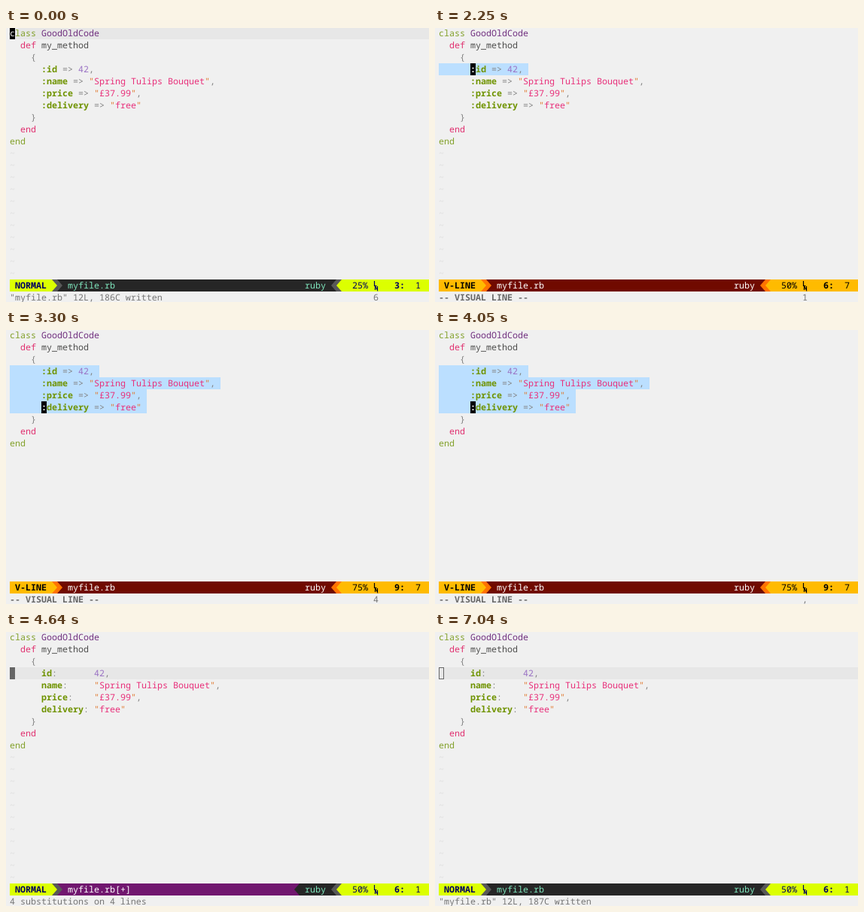
An HTML page that plays this animation: 562x365 px, repeating every 7160 ms.

```html
<!DOCTYPE html>
<html lang="en">
<head>
<meta charset="utf-8">
<style>
  html, body { margin: 0; width: 100%; height: 100%; overflow: hidden; background: #f0f0f0; }
  svg { display: block; }
  text {
    font: 300 11.6667px "Noto Sans Mono", "DejaVu Sans Mono", monospace;
    white-space: pre;
    text-rendering: geometricPrecision;
  }
  .b { font-weight: 700; }
</style>
</head>
<body>
<svg id="stage" width="562" height="365" viewBox="0 0 562 365"></svg>
<script>
(() => {
const LOOP = 7160;
const CELL = 7, ROW = 16, LEFT = 5;
const STATUS_ROW = 21, COMMAND_ROW = 22;

const INK = {
  key: '#82a02a', type: '#70307f', pink: '#e0306f', name: '#4d4d4c',
  sym: '#6f9300', op: '#828282', num: '#9a72c4', str: '#e8307a', quote: '#e07a30'
};

const MODES = {
  normal: { label: 'NORMAL', a: '#dcff00', b: '#585858', c: '#262626', x: '#262626',
            ink: '#00005f', file: '#7fe6bd', type: '#7fe6bd' },
  visual: { label: 'V-LINE', a: '#ffbb00', b: '#ff7300', c: '#700a00', x: '#700a00',
            ink: '#000000', file: '#ffffff', type: '#ffffff' }
};
MODES.modified = { ...MODES.normal, c: '#71176f', file: '#ffffff' };

const PAIRS = [['id', '42'], ['name', 'Spring Tulips Bouquet'], ['price', '£37.99'], ['delivery', 'free']];

// Each state inherits whatever it does not change from the one before.
const steps = [
  [0,    { mode: 'normal', row: 0, col: 0, cursor: 'block', pct: 25, line: 3, keys: '6', tildes: true,
           message: '"myfile.rb" 12L, 186C written', aligned: false, file: 'myfile.rb' }],
  [600,  { row: 3, col: 6, pct: 50, line: 6, keys: '' }],
  [2250, { mode: 'visual', message: '-- VISUAL LINE --', keys: '1' }],
  [2700, { keys: '3' }],
  [3300, { row: 6, pct: 75, line: 9, keys: '4', tildes: false }],
  [4050, { keys: ',' }],
  [4350, { keys: '4,o' }],
  [4490, { keys: '4,oc' }],
  [4640, { mode: 'modified', row: 3, col: 0, cursor: 'dim', pct: 50, line: 6, keys: '', tildes: true,
           message: '4 substitutions on 4 lines', aligned: true, file: 'myfile.rb[+]' }],
  [5540, { keys: ';' }],
  [5840, { mode: 'normal', keys: '', message: '"myfile.rb" 12L, 187C written', file: 'myfile.rb' }],
  [7040, { cursor: 'hollow' }]
];
const states = [];
for (const [at, change] of steps) states.push({ ...states.at(-1), ...change, at });

const colX = col => LEFT + col * CELL;
const rowY = row => row * ROW - 1;
const escapeText = s => s.replace(/&/g, '&amp;').replace(/</g, '&lt;').replace(/>/g, '&gt;');

const fill = (row, from, to, color) =>
  `<rect x="${colX(from)}" y="${rowY(row)}" width="${(to - from) * CELL}" height="${ROW}" fill="${color}"/>`;

const write = (row, col, s, color, bold) =>
  `<text x="${colX(col)}" y="${row * ROW + 11}" fill="${color}"${bold ? ' class="b"' : ''}>${escapeText(s)}</text>`;

function arrow(col, color, back, dir) {
  const base = colX(dir > 0 ? col : col + 1);
  return fill(STATUS_ROW, col, col + 1, back) +
    `<path d="M${base} ${rowY(STATUS_ROW)}l${dir * CELL} ${ROW / 2}l${-dir * CELL} ${ROW / 2}z" fill="${color}"/>`;
}

function pairTokens([key, value], index, aligned) {
  const tokens = aligned
    ? [['sym', key], ['op', ':'.padEnd(10 - key.length)]]
    : [['sym', ':' + key], ['op', ' => ']];
  if (index) tokens.push(['quote', '"'], ['str', value], ['quote', '"']);
  else tokens.push(['num', value]);
  if (index < PAIRS.length - 1) tokens.push(['op', ',']);
  return [['op', '      '], ...tokens];
}

const codeLines = aligned => [
  [['key', 'class '], ['type', 'GoodOldCode']],
  [['op', '  '], ['pink', 'def '], ['name', 'my_method']],
  [['op', '    {']],
  ...PAIRS.map((pair, i) => pairTokens(pair, i, aligned)),
  [['op', '    }']],
  [['op', '  '], ['pink', 'end']],
  [['key', 'end']]
];

const plain = tokens => tokens.map(token => token[1]).join('');

function drawLine(tokens, row) {
  let col = 0, out = '';
  for (const [kind, s] of tokens) {
    const indent = s.length - s.trimStart().length;
    if (s.trim()) out += write(row, col + indent, s.trim(), INK[kind], kind === 'sym');
    col += s.length;
  }
  return out;
}

function drawCursor({ row, col, cursor }, lines) {
  if (cursor === 'hollow')
    return `<rect x="${colX(col) + .5}" y="${rowY(row) + .5}" width="${CELL - 1}" height="${ROW - 1}" fill="none" stroke="#666"/>`;
  if (cursor === 'dim') return fill(row, col, col + 1, '#666');
  return fill(row, col, col + 1, '#000') + write(row, col, plain(lines[row])[col], '#f0f0f0', row > 0);
}

function drawStatus(s) {
  const m = MODES[s.mode], r = STATUS_ROW, y = rowY(r);
  let out = fill(r, 0, 80, m.c) + fill(r, 0, 8, m.a) + write(r, 1, m.label, m.ink, true) +
    arrow(8, m.a, m.b, 1) + arrow(9, m.b, m.c, 1) + write(r, 11, s.file, m.file);
  if (m.x !== m.c) out += arrow(54, m.x, m.c, -1) + fill(r, 55, 61, m.x);
  out += write(r, 56, 'ruby', m.type) + arrow(61, m.b, m.x, -1) + arrow(62, m.a, m.b, -1) +
    fill(r, 63, 80, m.a) + write(r, 65, s.pct + '%', m.ink) +
    write(r, 73, s.line + ':', m.ink, true) + write(r, 77, String(s.col + 1), m.ink);
  // Line-number glyph: a small L above a small N.
  return out + `<path d="M${colX(69) + 1.5} ${y + 2}v6.5h3M${colX(69) + 2.5} ${y + 14}v-5l3 5v-5" fill="none" stroke="${m.ink}" stroke-width="1.2"/>`;
}

function draw(s) {
  const lines = codeLines(s.aligned), visual = s.mode === 'visual';
  let out = '<rect width="562" height="365" fill="#f0f0f0"/>';
  if (visual) {
    for (let row = 3; row <= s.row; row++) out += fill(row, 0, plain(lines[row]).length + 1, '#bbdfff');
  } else out += fill(s.row, 0, 80, '#e7e7e7');
  out += lines.map(drawLine).join('');
  for (let row = lines.length; s.tildes && row < STATUS_ROW; row++) out += write(row, 0, '~', '#dedede');
  return out + drawCursor(s, lines) + drawStatus(s) +
    write(COMMAND_ROW, 0, s.message, visual ? '#666' : '#757575', visual) +
    write(COMMAND_ROW, 69, s.keys, '#757575');
}

const stage = document.getElementById('stage');
const start = performance.now();
let shown;
function update(now) {
  const t = Math.max(0, now - start) % LOOP;
  const state = states.findLast(s => s.at <= t);
  if (state !== shown) stage.innerHTML = draw(shown = state);
  requestAnimationFrame(update);
}
update(start);
})();
</script>
</body>
</html>
```
